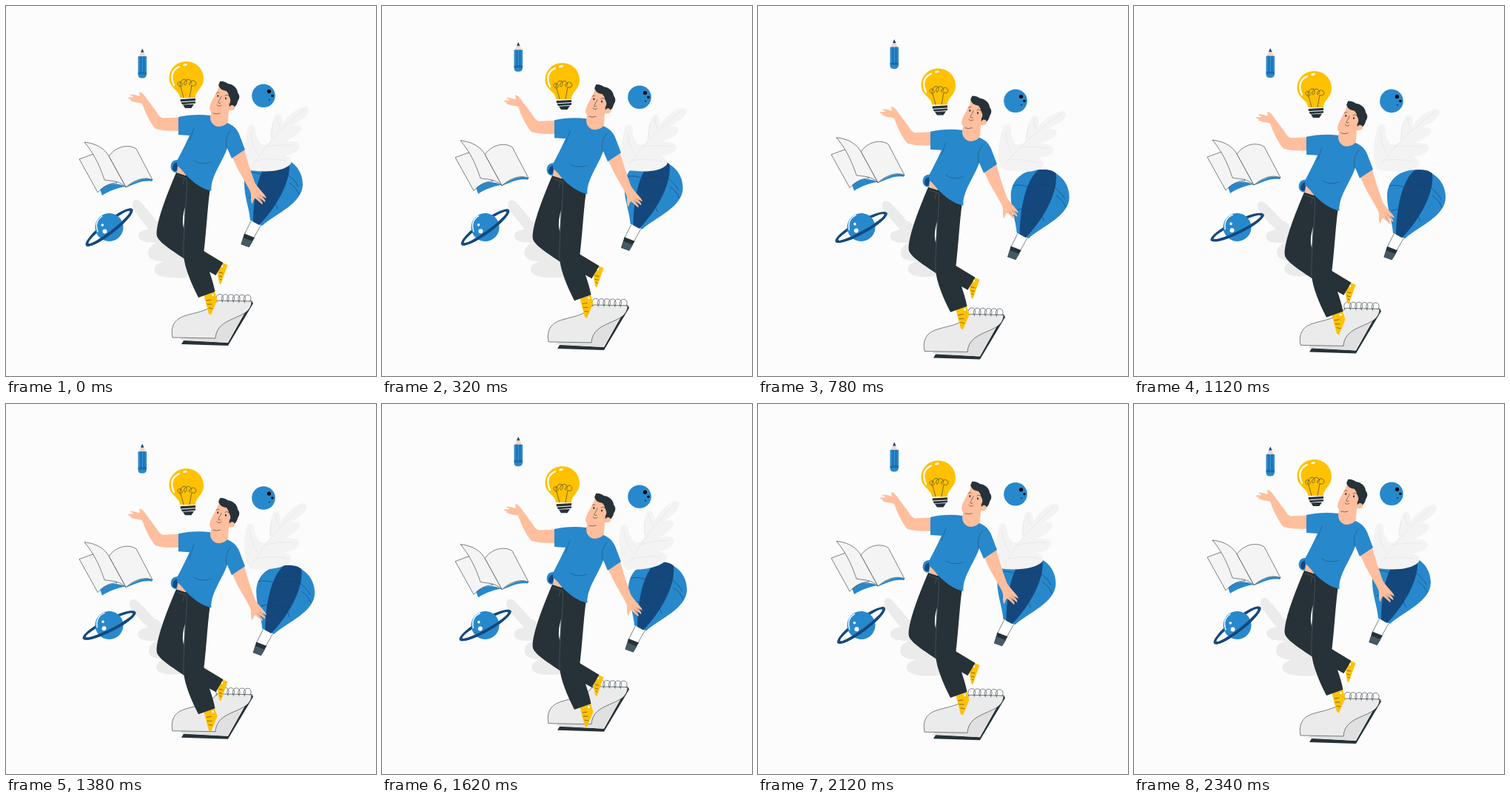
These frames come from a looping animation (500 by 500 pixels, 2.36 s). An HTML page:

```html
<!DOCTYPE html>
<html lang="en">
<head>
<meta charset="utf-8">
<title>Floating ideas</title>
<style>
  html, body { margin: 0; width: 100%; height: 100%; overflow: hidden; background: #fcfcfc; }
  svg { display: block; width: 100%; height: 100%; }
  .blue { fill: #2888cc; }
  .navy { fill: #14487d; }
  .dark { fill: #263238; }
  .skin { fill: #ffbe9d; }
  .gold { fill: #ffc100; }
  .white { fill: #fff; }
  .paper { fill: #f4f4f4; stroke: #263238; stroke-width: .6; stroke-linejoin: round; }
  .line { fill: none; stroke: #263238; stroke-width: .6; stroke-linecap: round; }
  .seam { fill: none; stroke: #14487d; stroke-width: .7; }
  .vein { fill: none; stroke: #e6e6e6; stroke-width: .8; }
</style>
</head>
<body>
<svg viewBox="0 0 500 500">
  <g id="backLeaf" fill="#ebebeb">
    <path d="M171 266C172 261 178 261 182 265C189 273 196 281 203 291C209 290 214 300 214 310C225 308 236 322 245 336V367C232 368 207 369 201 359C198 351 207 347 215 345C205 346 192 343 192 334C192 326 198 322 205 320C194 320 180 319 179 311C179 304 186 302 193 302C185 291 174 279 171 271Z"/>
  </g>

  <g id="balloon">
    <path class="white" d="M351 309L342 327L356 331L366 315Z"/>
    <path class="line" d="M351 309L342 327M364 315L355 331"/>
    <path class="dark" d="M342 325.500L356 331L348.500 344L337.500 340Z"/>
    <path fill="#455a64" d="M340.500 331L353.500 336L348.500 344L337.500 340Z"/>
    <path class="blue" d="M350 307.500C349 292 342 276 342 258C342 235 359 222 382 222C407 222 421 240 421 259C421 285 385 298 366 315Z"/>
    <path class="navy" d="M354 309.500C354 275 362 237 379 222.500C390 221 399 223 403 227C406 254 386 289 362 314Z"/>
    <path class="seam" d="M345 244Q356 241 368 247M399 245Q409 251 415 262M403 257Q413 264 416 273M348 277Q355 274 361 277M374 277Q384 281 387 292"/>
    <path class="line" opacity=".5" d="M368 247Q384 239 400 246M360 278Q368 272 384 279"/>
  </g>

  <g id="leaf">
    <path fill="#f3f3f3" d="M329 222C322 208 321 186 326 168C327 160 335 158 337 166C337 176 341 182 345 187C351 188 357 185 358 180C357 168 360 151 365 147C371 143 374 150 373 160C380 150 391 139 403 136C409 135 411 142 406 147C402 153 393 157 387 162C397 159 402 164 397 170C391 177 383 180 377 184C385 181 398 183 397 190C396 198 384 201 376 202C382 203 387 207 385 213C376 224 350 225 329 222Z"/>
    <path class="vein" d="M403 139Q361 174 334 214M371 166Q366 157 366 149M359 178Q358 169 361 158M350 190Q370 187 389 188M337 209Q358 205 378 209M341 201Q332 188 331 171"/>
  </g>

  <g id="pencil">
    <path fill="#f3d6c8" d="M184 58L189.500 69H179Z"/>
    <path class="navy" d="M184.200 57.500L186.500 62.500H182Z"/>
    <path class="blue" d="M178.500 68H190V92Q190 97.500 184 97.500T178.500 92Z"/>
    <path class="seam" d="M182.300 68V90M186.500 68V90M178.500 90H190M178.500 91.700H190"/>
  </g>

  <g id="bulb">
    <path class="gold" d="M243.500 75C257 75 267 85 267 98C267 111 256 114 256 124H235C235 114 220.500 111 220.500 98C220.500 85 230 75 243.500 75Z"/>
    <path fill="none" stroke="#fff" stroke-width="2.200" stroke-linecap="round" d="M227 107Q219 89 234 82"/>
    <ellipse class="white" cx="242" cy="79.500" rx="3" ry="1.400" transform="rotate(-12 242 79.500)"/>
    <path class="line" d="M240 124L236 109C230 108 231 101 236 103C241 107 236 110 235 107C236 97 245 97 244 104C243 109 239 106 241 103C244 97 252 99 250 105C248 109 246 105 249 103C253 98 259 103 256 107C254 109 251 108 251 107L248 124"/>
    <path class="white" d="M235.500 124H256V133H236Z"/>
    <path class="dark" d="M235.500 126L256 124.800V128L236 129.200ZM236.500 130.200L256 129V131.600L238 133ZM239 133.600L254 132.700L250.500 138H242Z"/>
  </g>

  <g id="ball">
    <circle class="blue" cx="348" cy="121.300" r="15.800"/>
    <circle cx="355.500" cy="115.300" r="2.600"/>
    <circle cx="360" cy="121.300" r="1.700"/>
    <circle cx="356" cy="126.700" r=".8"/>
  </g>

  <g id="book">
    <path class="blue" d="M127 248C139 237 152 240 162 244C152 245 139 250 130 256Z"/>
    <path class="blue" d="M162 245C176 234 190 231 198 235L197 237C184 235 173 241 163 245Z"/>
    <path class="paper" d="M99 207L118 200L150 239C139 239 130 245 124 252Z"/>
    <path class="paper" d="M162 245L139 203C150 188 167 187 176 193L198 235C187 230 173 235 162 245Z"/>
    <path class="paper" d="M106 184C124 186 134 194 139 203L162 245C152 235 142 237 133 235C129 223 122 203 106 184Z"/>
  </g>

  <g id="planet">
    <g transform="translate(139.500 299) rotate(-38)">
      <path id="ring" class="navy" d="M-40 0A40 9 0 0 0 40 0L35.500 0A35.500 5 0 0 1 -35.500 0Z"/>
      <use href="#ring" transform="scale(1 -1)"/>
      <circle class="blue" r="19"/>
      <use href="#ring"/>
    </g>
    <path fill="none" stroke="#fff" stroke-width="1.400" stroke-linecap="round" d="M124 305Q119 291 130 284"/>
    <circle class="white" cx="130.300" cy="296" r="1.800"/>
    <circle class="white" cx="133.500" cy="304.500" r="3"/>
  </g>

  <g id="pad">
    <path class="dark" d="M240 452L300 455L332 398L334 402L300 459L237 457Z"/>
    <path fill="#e0e0e0" d="M284 398L332 398L299 455L235 451L240 447Z"/>
    <path fill="#ebebeb" stroke="#263238" stroke-width=".6" d="M225 448C222 431 229 422 244 418C260 413 274 413 285 398L332 399C331 426 285 417 283 449Z"/>
    <g id="rings" class="line"></g>
  </g>

  <g id="man">
    <path class="gold" d="M290 346L299.500 350L290 376.500L288 374L286 362Z"/>
    <path class="line" d="M288 360L293 361M288 365L292 366M289 369L291 370"/>
    <path class="white" d="M291 350h2v3h-2z"/>
    <path class="gold" d="M267.500 391L282 386L285.500 397L277 417.500L274 416Z"/>
    <path class="line" d="M271 398L277 397M272 403L278 403M274 408L279 409"/>
    <circle class="white" cx="279.500" cy="390.500" r="1.600"/>

    <path class="dark" d="M230 225L255 232L267 331L293.500 347L283.500 364C266 354 255 350 240 341C227 332 207 320 204 311C201 297 217 255 230 225Z"/>
    <path fill="#fcfcfc" d="M242 272C238 285 238 296 241 302Z"/>
    <path class="dark" d="M243 226L275.500 249C272 276 271 301 267.500 331C269 347 279 366 282.500 386L260 394C251 376 241 354 240 336C238 311 243 276 243 238Z"/>
    <path fill="none" stroke="#54626a" stroke-width=".6" d="M231 229L244 233C246 251 239 300 240 340M241 233L239 241"/>

    <path class="skin" d="M235 150.500L212 151.500C207 150 205 145 202 141L190 125C187 120 182 115 180 116.500C180 119 182 121 180 122C176 120 170 119 168 120C168 121 173 122 172 123.500C168 123 164 123 165 125L169 126C167 127 168 128 170 128.500C175 131 180 130 184 132C188 143 194 157 202 166C212 169 224 169 235 168.500Z"/>
    <path class="skin" d="M305 202L322 194C326 209 331 224 336 238C340 246 352 256 352 260L346 257C350 261 351 264 350 265L342 259C346 264 348 267 346 268L337 260C335 260 334 264 333 267C331 267 331 260 331 254C330 246 315 228 305 202Z"/>
    <path class="line" opacity=".55" d="M343 256L348 260M340 258L345 264"/>

    <path class="blue" d="M231 208C223 208 221 217 224 222C228 226 232 226 233 221L239 211Z"/>
    <path class="navy" d="M232 211C226 212 224 218 226 222C229 225 232 222 232 218Z"/>
    <path class="skin" d="M232 216L245 228L242 229L231 225Z"/>
    <path class="blue" d="M233 150C246 147 262 146 276 148L299 158C307 161 312 166 315 173L323 194L305 206L299 192C292 212 276 231 277.500 250C264 247 252 238 242 227C237 220 233 217 231 215V209C236 200 243 186 248 175L233 174Z"/>
    <path class="line" opacity=".65" d="M248 182Q251 173 254 165M254 209Q263 216 277 211M298 192Q295 176 304 168"/>

    <path class="skin" d="M278 138L276 150C276 160 284 163 287 163C294 163 299 159 300 156L301 140Z"/>
    <path class="skin" d="M288 108C284 121 276 128 275 138C275 144 284 148 293 145L302 141C308 141 312 137 308 133L306 114Z"/>
    <path class="dark" d="M288 109C286 106 289 104 289 102C293 101 297 103 300 105C308 106 313 112 313 117C317 122 315 126 313 129C312 134 309 138 305 137C302 138 301 136 302 132C305 127 302 124 301 121C301 118 299 117 298 115C294 114 290 113 288 109Z"/>
    <path class="skin" d="M302 136C306 131 311 136 308 140C305 142 302 141 301 139Z"/>
    <path class="line" d="M291 122C290 126 286 130 287 131Q288 132 290 131M285 133.500Q288 137 291 134M284 118Q286 116 288 117M296 121Q298 119 301 121M280 145Q284 147 289 145"/>
    <ellipse class="dark" cx="286.300" cy="121.500" rx="1" ry="1.500"/>
    <ellipse class="dark" cx="297" cy="124.800" rx="1" ry="1.500"/>
  </g>
</svg>
<script>
const LOOP = 2360;
const part = id => document.getElementById(id);

part('rings').innerHTML = Array.from({ length: 6 }, (_, i) =>
  `<path d="M${285 + i * 7.5} ${400 + i * .2}c-3 -6 0 -10.500 4 -10.500c5 0 5.500 6 3.500 9"/>`).join('');

// Cosine-eased value between [time, value] keys.
function ease(keys, t) {
  t = (t + LOOP) % LOOP;
  const i = keys.findIndex(key => key[0] > t);
  const [t0, v0] = keys[i - 1], [t1, v1] = keys[i];
  return v0 + (v1 - v0) * (1 - Math.cos(Math.PI * (t - t0) / (t1 - t0))) / 2;
}
const wave = (t, period) => (1 - Math.cos(2 * Math.PI * t / period)) / 2;
const swing = t => ease([[0, 0], [850, 1], [1690, -.9], [LOOP, 0]], t);
const drift = t => ease([[0, 0], [930, 1], [LOOP, 0]], t);

const move = (id, x, y) => part(id).setAttribute('transform', `translate(${x} ${y})`);
const turn = (id, angle, x, y) => part(id).setAttribute('transform', `rotate(${angle} ${x} ${y})`);

function draw(now) {
  const t = now % LOOP;
  const slow = wave(t - 12, LOOP);
  move('man', 0, 27 * slow);
  move('bulb', 0, 13 * slow);
  move('pencil', 0, -16 * wave(t - 10, LOOP / 2));
  move('ball', 0, 7.4 * drift(t));
  move('balloon', 21 * drift(t) - 20, 18 * drift(t) - 18);
  move('book', 0, -6.3 * swing(t + 30));
  move('pad', 0, 18.8 * swing(t));
  turn('leaf', 6 * swing(t), 348, 215);
  turn('backLeaf', -4.5 * slow, 200, 320);
  turn('planet', 12 * slow, 139.5, 299);
  requestAnimationFrame(draw);
}
draw(performance.now());
</script>
</body>
</html>
```
